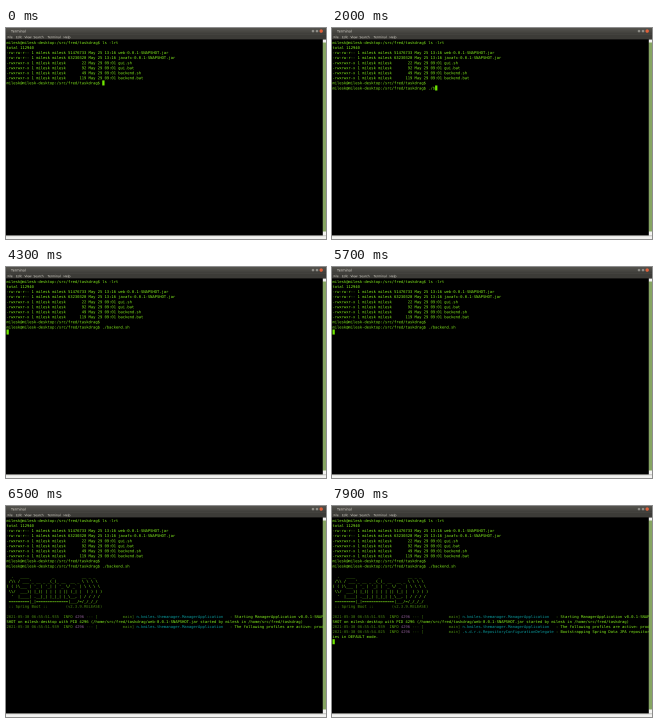
An HTML page with a canvas that plays this animation: 320 px wide and 211 px high, repeating every 8000 ms.

```html
<!DOCTYPE html>
<html lang="en">
<head>
<meta charset="utf-8">
<title>Terminal</title>
<style>
  html, body { margin: 0; width: 100%; height: 100%; overflow: hidden; background: #000; }
  canvas { display: block; width: 100vw; height: 100vh; }
</style>
</head>
<body>
<canvas id="stage" width="320" height="211"></canvas>
<script>
const W = 320, H = 211, LOOP = 8000, ZOOM = 4;
const COL = 2.28, ROW = 5.05, LEFT = 0.5, TOP = 12;
const MONO = '3.79px "DejaVu Sans Mono", "Noto Sans Mono", monospace';
const SANS = '"Noto Sans", "Open Sans", sans-serif';
const C = {
  text: '#84f01e', cursor: '#6fe800', green: '#559f0c',
  faint: '#4a8812', pid: '#85588c', logger: '#0b9a9c'
};

const view = document.getElementById('stage').getContext('2d');
view.imageSmoothingQuality = 'high';

// The scene is drawn large and scaled down, so small type stays even.
const sheet = document.createElement('canvas');
sheet.width = W * ZOOM;
sheet.height = H * ZOOM;
const g = sheet.getContext('2d');
g.scale(ZOOM, ZOOM);

const user = 'milesk';
const prompt = user + '@' + user + '-desktop:/src/fred/taskdrag$ ';

const file = (mode, size, date, name) =>
  `${mode} 1 ${user} ${user} ${String(size).padStart(8)} May ${date} ${name}`;

const listing = [
  prompt + 'ls -lrt',
  'total 112940',
  file('-rw-rw-r--', 51476733, '25 13:16', 'web-0.0.1-SNAPSHOT.jar'),
  file('-rw-rw-r--', 63230320, '25 13:16', 'javafx-0.0.1-SNAPSHOT.jar'),
  file('-rwxrwxr-x', 22, '29 09:01', 'gui.sh'),
  file('-rwxrwxr-x', 92, '29 09:01', 'gui.bat'),
  file('-rwxrwxr-x', 49, '29 09:01', 'backend.sh'),
  file('-rwxrwxr-x', 119, '29 09:01', 'backend.bat'),
  prompt
];

const banner = String.raw`
  .   ____          _            __ _ _
 /\\ / ___'_ __ _ _(_)_ __  __ _ \ \ \ \
( ( )\___ | '_ | '_| | '_ \/ _~ | \ \ \ \
 \\/  ___)| |_)| | | | | || (_| |  ) ) ) )
  '  |____| .__|_| |_|_| |_\__, | / / / /
 =========|_|==============|___/=/_/_/_/`.replace('~', '`').split('\n').slice(1);

const app = 'n.kmiles.themanager.ManagerApplication';
const logs = [
  { row: 19, at: 6500, time: '51.935', logger: app,
    msg: 'Starting ManagerApplication v0.0.1-SNAP',
    rest: `SHOT on ${user}-desktop with PID 4296 (/home/src/fred/taskdrag/web-0.0.1-SNAPSHOT.jar` +
          ` started by ${user} in /home/src/fred/taskdrag)` },
  { row: 21, at: 6500, time: '51.939', logger: app,
    msg: 'The following profiles are active: prod' },
  { row: 22, at: 7500, time: '54.025', logger: '.s.d.r.c.RepositoryConfigurationDelegate',
    msg: 'Bootstrapping Spring Data JPA repositor', rest: 'ies in DEFAULT mode.' }
];

const ENTER = 600, RUN = 4200, BANNER = 6300;
const keys = [
  [1500, '.'], [1600, '/'], [2000, 'b'], [2100, 'a'], [2200, 'c'],
  [2400, 'k'], [2600, 'end.'], [3500, 's'], [3600, 'h']
];

function put(text, row, col = 0, color = C.text) {
  g.fillStyle = color;
  const y = TOP + row * ROW + 3.95;
  for (let i = 0; i < text.length; i++) {
    if (text[i] !== ' ') g.fillText(text[i], LEFT + (col + i) * COL, y);
  }
}

function rect(x, y, w, h, color) {
  g.fillStyle = color;
  g.fillRect(x, y, w, h);
}

function drawWindow() {
  rect(0, 0, W, H, '#f2f2f0');
  const bar = g.createLinearGradient(0, 0, 0, 6);
  bar.addColorStop(0, '#55544f');
  bar.addColorStop(1, '#3f3e3a');
  rect(0, 0, W, 6.2, bar);
  rect(0, 6.2, W, 5.4, '#3c3b37');
  rect(0, 11.4, 316.8, 196, '#000');
  rect(316.8, 14.5, 3.2, 189, '#86a562');
  rect(0, 207.4, W, 0.8, '#b4b4b0');

  g.fillStyle = '#dfdbd2';
  g.font = '3.6px ' + SANS;
  g.fillText('Terminal', 5, 4.4);
  g.font = '3.2px ' + SANS;
  const menu = { File: 1.5, Edit: 10, View: 18.5, Search: 27.5, Terminal: 41.5, Help: 57.5 };
  for (const name in menu) g.fillText(name, menu[name], 10.2);

  [['#8f8e88', 307, 1.3], ['#8f8e88', 311, 1.3], ['#e0603a', 315.2, 1.7]].forEach(([color, x, r]) => {
    g.fillStyle = color;
    g.beginPath();
    g.arc(x, 3.1, r, 0, Math.PI * 2);
    g.fill();
  });
}

function drawLog({ row, time, logger, msg, rest }) {
  put('2021-05-30 06:55:' + time, row, 0, C.faint);
  put('INFO', row, 25, C.green);
  put('4296', row, 30, C.pid);
  put('--- [           main]', row, 35, C.faint);
  put(logger, row, 57, C.logger);
  put(':', row, 98, C.faint);
  put(msg, row, 100);
  if (rest) put(rest, row + 1);
}

function cursorOn(t) {
  if (t >= 4300) return Math.floor((t - 4300) / 600) % 2 === 0;
  return !(t >= 1200 && t < 1500) && !(t >= 3200 && t < 3500);
}

function drawCursor(t, typed) {
  if (!cursorOn(t)) return;
  let row = 8, col = prompt.length;
  if (t >= ENTER) { row = 9; col += typed.length; }
  if (t >= RUN) { row = 10; col = 0; }
  if (t >= BANNER) row = 19;
  if (t >= logs[0].at) row = 22;
  if (t >= logs[2].at) row = 24;
  rect(LEFT + col * COL, TOP + row * ROW, COL, ROW, C.cursor);
}

function draw(t) {
  drawWindow();
  g.font = MONO;
  listing.forEach((line, row) => put(line, row));
  const typed = keys.filter(k => t >= k[0]).map(k => k[1]).join('');
  if (t >= ENTER) put(prompt + typed, 9);
  if (t >= BANNER) {
    banner.forEach((line, i) => put(line, 11 + i));
    put(' :: Spring Boot ::', 17, 0, C.green);
    put('(v2.3.9.RELEASE)', 17, 26, C.faint);
  }
  logs.filter(log => t >= log.at).forEach(drawLog);
  drawCursor(t, typed);
  view.drawImage(sheet, 0, 0, W, H);
}

const start = performance.now();
function tick() {
  draw((performance.now() - start) % LOOP);
  requestAnimationFrame(tick);
}
tick();
</script>
</body>
</html>
```
